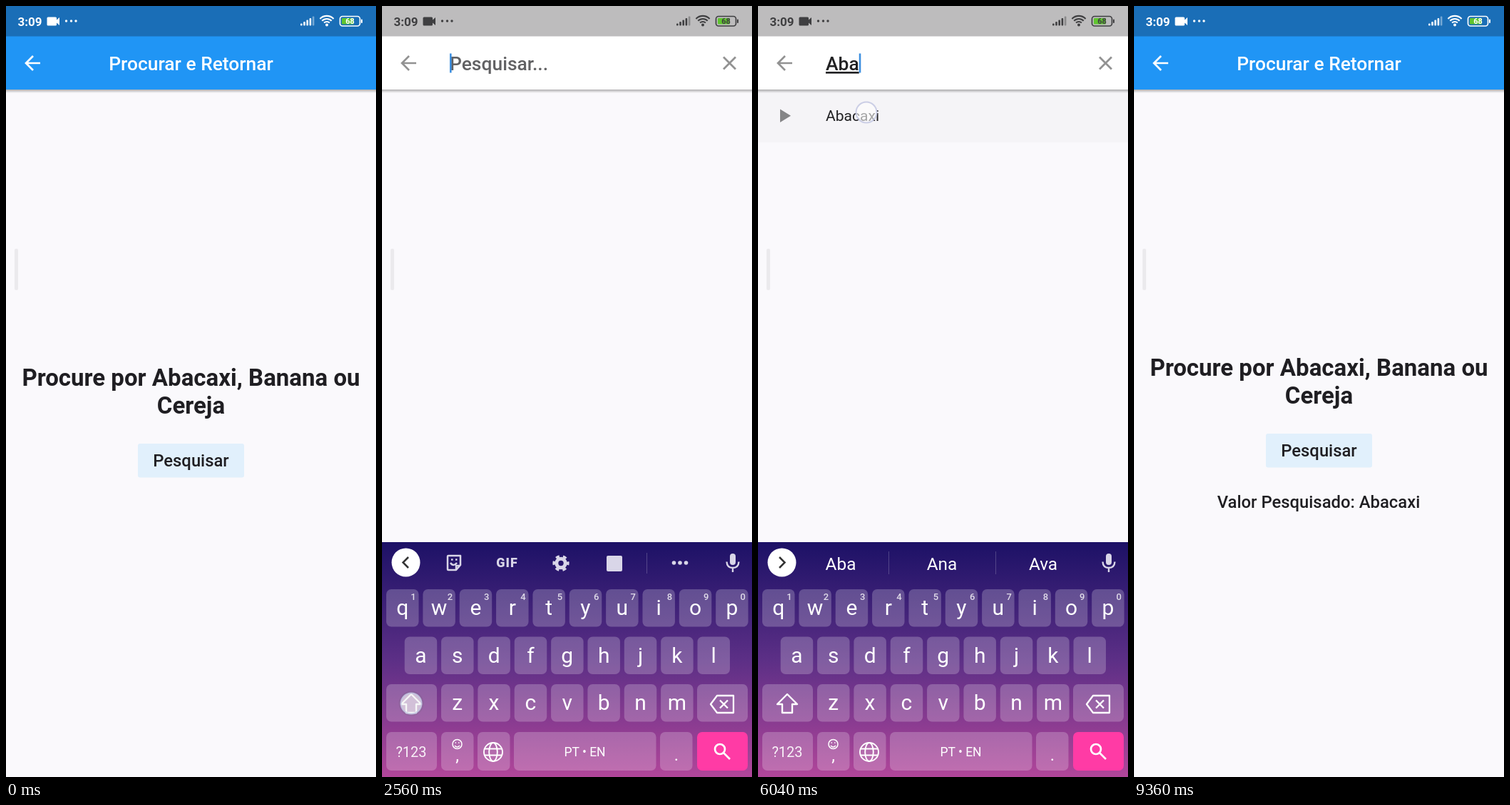
These frames come from a looping animation (519x1080 px, 9600 ms). An HTML page:

```html
<!DOCTYPE html>
<html lang="pt">
<head>
<meta charset="utf-8">
<style>
  html, body { margin: 0; width: 100%; height: 100%; overflow: hidden; background: #faf9fc; }
  svg { display: block; width: 100vw; height: 100vh; }
  text { font-family: Roboto, sans-serif; white-space: pre; }
  .mid { text-anchor: middle; }
  .bar { font-size: 26.4px; font-weight: 500; }
  .line { fill: none; stroke: currentColor; }
  .body { fill: #1f1e22; text-anchor: middle; }
</style>
</head>
<body>
<svg viewBox="0 0 519 1080">
  <defs>
    <linearGradient id="night" x1="0" y1="0" x2="0" y2="1">
      <stop offset="0" stop-color="#1c1166"/>
      <stop offset=".5" stop-color="#5c2f86"/>
      <stop offset="1" stop-color="#b1469a"/>
    </linearGradient>
    <linearGradient id="shade" x1="0" y1="0" x2="0" y2="1">
      <stop offset="0" stop-opacity=".3"/>
      <stop offset="1" stop-opacity="0"/>
    </linearGradient>
    <path id="arrow" class="line" stroke-width="2.7" d="M48 80H29M38 70L28 80L38 90"/>
  </defs>

  <g id="home">
    <rect width="519" height="1080" fill="#faf9fc"/>
    <rect y="117" width="519" height="5" fill="url(#shade)"/>
    <rect y="42" width="519" height="75" fill="#2095f5"/>
    <rect width="519" height="42.5" fill="#1a6eb7"/>
    <use href="#arrow" color="#fff"/>
    <text class="bar mid" x="259.5" y="90" fill="#fff">Procurar e Retornar</text>
    <g id="content">
      <g class="body" font-size="33" font-weight="700">
        <text x="259.5" y="532">Procure por Abacaxi, Banana ou</text>
        <text x="259.5" y="571">Cereja</text>
      </g>
      <rect x="185" y="613" width="149" height="47.5" rx="3" fill="#e1f0fc"/>
      <rect id="press" x="185" y="613" width="149" height="47.5" rx="3"/>
      <g class="body" font-size="23.8" font-weight="500">
        <text x="259.5" y="645">Pesquisar</text>
        <text id="result" x="259" y="717">Valor Pesquisado: Abacaxi</text>
      </g>
    </g>
  </g>

  <g id="search">
    <rect width="519" height="1080" fill="#faf9fc"/>
    <rect id="rowPress" y="117" width="519" height="74"/>
    <g id="list"></g>
    <rect y="117" width="519" height="5" fill="url(#shade)"/>
    <rect y="42" width="519" height="75" fill="#fff"/>
    <rect width="519" height="42.5" fill="#bdbcbd"/>
    <use href="#arrow" color="#929292"/>
    <path class="line" color="#929292" stroke-width="2.7" d="M479 71.5L496 88.5M496 71.5L479 88.5"/>
    <text id="query" class="bar" x="95" y="90"></text>
    <rect id="cursor" y="66.5" width="2.6" height="27" fill="#3e90e0"/>
  </g>

  <rect x="12" y="340" width="5" height="58" rx="2" fill="#ebeaed"/>

  <g id="status" fill="currentColor">
    <text x="16.5" y="27.5" font-size="17" font-weight="600">3:09</text>
    <path d="M59 15.5H69.5Q71 15.5 71 17V19.5L75 16V27L71 23.5V26Q71 27.5 69.5 27.5H59Q57.500 27.5 57.5 26V17Q57.5 15.5 59 15.5Z"/>
    <circle cx="84.5" cy="21" r="1.7"/><circle cx="91.500" cy="21" r="1.7"/><circle cx="98" cy="21" r="1.7"/>
    <g id="signal"></g>
    <g id="wifi" class="line" stroke-width="2.1"></g>
    <circle cx="450" cy="26.5" r="2"/>
    <rect x="468.500" y="14.500" width="28" height="13.500" rx="3.500" class="line" stroke-width="1.7"/>
    <rect x="498" y="18.500" width="2" height="5.500" rx="1"/>
    <rect x="471" y="17" width="17" height="8.500" rx="1" fill="#5fc52e"/>
    <text class="mid" x="482.500" y="25.200" font-size="11" font-weight="600">68</text>
  </g>

  <g id="keyboard" color="#fff" fill="#fff">
    <rect y="751" width="519" height="329" fill="url(#night)"/>
    <g id="tools" color="#d9d6e8" fill="#d9d6e8">
      <path class="line" stroke-width="2.500" stroke-linejoin="round" d="M93 770H110V783L104 790H93Q92 790 92 789V771Q92 770 93 770ZM104 789V784H110M96 780Q100 786 105 780M97 775.500H99.500M103 775.500H105.500"/>
      <text class="mid" x="175.500" y="786" font-size="18" font-weight="900" letter-spacing="1">GIF</text>
      <g class="line">
        <circle cx="251" cy="780.500" r="6.200" stroke-width="5"/>
        <circle cx="251" cy="780.500" r="9.800" stroke-width="3.600" stroke-dasharray="5.130" stroke-dashoffset="2.500"/>
      </g>
      <rect x="315" y="770" width="22" height="22" rx="2"/>
      <rect x="371" y="766" width="1" height="29" opacity=".25"/>
      <circle cx="409.500" cy="780" r="2.800"/><circle cx="418" cy="780" r="2.800"/><circle cx="426.500" cy="780" r="2.800"/>
    </g>
    <g id="words" font-size="24.400" class="mid">
      <text x="116" y="790"></text><text x="258" y="790"></text><text x="400" y="790"></text>
      <path class="line" opacity=".2" d="M183.500 764V796M333.500 764V796"/>
    </g>
    <circle cx="33.500" cy="779.500" r="20"/>
    <path id="chevron" class="line" color="#333" stroke-width="2.500"/>
    <g color="#d9d6e8" fill="#d9d6e8">
      <rect x="488" y="767" width="8" height="16" rx="4"/>
      <path class="line" stroke-width="2.400" d="M483.500 778.500Q484 787 492 787T500.500 778.500M492 787V793"/>
    </g>
    <g id="keys"></g>
    <path id="shift" class="line" stroke-width="2.400" stroke-linejoin="round" d="M41 964L55 978H48V990H34V978H27Z"/>
    <path class="line" stroke-width="2.300" stroke-linejoin="round" d="M470 966H493V990H470L461 978ZM474 972.500L485 983.500M485 972.500L474 983.500"/>
    <g class="mid">
      <text x="41" y="1052" font-size="20" opacity=".9">?123</text>
      <text x="105.500" y="1058" font-size="24">,</text>
      <text x="284.500" y="1051" font-size="17.500">PT • EN</text>
      <text x="413" y="1057" font-size="24">.</text>
    </g>
    <g class="line" stroke-width="1.500">
      <circle cx="105.500" cy="1034" r="6.500"/>
      <path d="M102 1036Q105.500 1040 109 1036M102.500 1032H104M107 1032H108.500"/>
    </g>
    <g class="line" stroke-width="1.900">
      <circle cx="156" cy="1045" r="13"/><ellipse cx="156" cy="1045" rx="5.800" ry="13"/>
      <path d="M144 1040.500H168M144 1049.500H168"/>
    </g>
    <path class="line" stroke-width="2.700" d="M479.500 1046.500L488 1055"/>
    <circle class="line" cx="474" cy="1041" r="7" stroke-width="2.700"/>
  </g>

  <g id="touch">
    <circle id="halo" fill="#555b66"/>
    <circle r="14.500" fill="#fff" fill-opacity=".6" stroke="#c3c7e2" stroke-width="2" stroke-opacity=".85"/>
  </g>
</svg>

<script>
const LOOP = 9600;
const $ = id => document.getElementById(id);
const clamp = v => Math.max(0, Math.min(1, v));
const ramp = (t, start, length) => clamp((t - start) / length);
const show = (el, on) => el.setAttribute('visibility', on ? 'visible' : 'hidden');

function add(parent, tag, attrs, text = '') {
  const el = document.createElementNS('http://www.w3.org/2000/svg', tag);
  for (const name in attrs) el.setAttribute(name, attrs[name]);
  el.textContent = text;
  return parent.appendChild(el);
}

const rows = ['Abacaxi', 'Banana', 'Cereja'].map((name, i) => {
  const row = add($('list'), 'g', { transform: `translate(0 ${i * 74})` });
  add(row, 'path', { d: 'M31 144.5L46 153.700L31 163Z', fill: '#858587' });
  add(row, 'text', { x: 95, y: 161, 'font-size': 21.1, fill: '#212123' }, name);
  return row;
});

for (let i = 0; i < 5; i++) {
  const h = 3 + i * 2.5;
  add($('signal'), 'rect', { x: 413 + i * 4.2, y: 27.5 - h, width: 2.6, height: h, rx: 1, opacity: i < 4 ? 1 : .4 });
}
for (const r of [5.5, 9.5, 13.5]) {
  const s = r * .71;
  add($('wifi'), 'path', { d: `M${450 - s} ${27.5 - s}A${r} ${r} 0 0 1 ${450 + s} ${27.5 - s}` });
}

const PITCH = 51.35;
const letters = [];
const key = (x, y, width, height = 52.5, fill = 'rgba(255,255,255,.22)') =>
  add($('keys'), 'rect', { x, y, width, height, rx: 7, fill });

[['qwertyuiop', 6, 817], ['asdfghjkl', 31.7, 883.5], ['zxcvbnm', 83, 950]].forEach(([chars, left, y], line) => {
  [...chars].forEach((char, i) => {
    const x = left + i * PITCH;
    key(x, y, 45.5);
    const el = add($('keys'), 'text', { x: x + 22.7, y: y + 36, 'font-size': 30, class: 'mid' });
    letters.push({ el, char });
    if (!line) add($('keys'), 'text', { x: x + 38, y: y + 15, 'font-size': 13, 'font-weight': 500, class: 'mid', opacity: .8 }, (i + 1) % 10);
  });
});
key(6, 950, 71); key(442, 950, 71);
key(6, 1017, 71, 54); key(83, 1017, 45.5, 54); key(134, 1017, 45.5, 54);
key(185, 1017, 199.5, 54); key(390, 1017, 45.5, 54);
key(442, 1017, 71, 54, '#ff3ba5');

// x, y, finger down, finger up
const touches = [
  [218, 643, 820, 1080],
  [41, 977, 2480, 2600],
  [54, 910, 3180, 3300],
  [310, 977, 4180, 4300],
  [54, 910, 4880, 5000],
  [152, 149, 6000, 6840]
];
// time, typed text, suggestions
const typing = [
  [1400, '', []],
  [3300, 'A', ['A', 'Aí', 'Acho']],
  [4300, 'Ab', ['Ab', 'Abre', 'Abs']],
  [5000, 'Aba', ['Aba', 'Ana', 'Ava']]
];

function drawTouch(t) {
  const active = touches.find(([, , down, up]) => t >= down && t < up + 400);
  show($('touch'), active);
  if (!active) return;
  const [x, y, down, up] = active;
  const press = ramp(t, down + 40, 160) * (1 - ramp(t, up, 120));
  $('touch').setAttribute('transform', `translate(${x} ${y})`);
  $('touch').setAttribute('opacity', ramp(t, down, 40) * (1 - ramp(t, up, 400)));
  $('halo').setAttribute('r', 15 + 10 * press);
  $('halo').setAttribute('opacity', .55 * press);
}

function drawSearch(t) {
  const [since, text, words] = typing.findLast(step => t >= step[0]) || typing[0];
  const closing = t > 6900;
  const query = $('query');
  query.textContent = text || 'Pesquisar...';
  query.setAttribute('fill', text ? '#212123' : '#616163');
  query.style.textDecoration = text && !closing ? 'underline' : 'none';
  $('cursor').setAttribute('x', text ? 95 + query.getComputedTextLength() : 95);
  show($('cursor'), !closing && t >= 1400 && (t - since) % 1000 < 500);
  rows.forEach((row, i) => show(row, text && (text === 'A' || i === 0)));
  $('rowPress').setAttribute('opacity', .02 * ramp(t, 5990, 40) + .05 * ramp(t, 6060, 200));

  show($('tools'), !text);
  show($('words'), text);
  words.forEach((word, i) => $('words').children[i].textContent = word);
  $('chevron').setAttribute('d', text ? 'M30 772L37.500 779.500L30 787' : 'M37 772L29.500 779.500L37 787');
  const upper = t >= 2600 && t < 3300;
  letters.forEach(({ el, char }) => el.textContent = upper ? char.toUpperCase() : char);
  $('shift').style.fill = upper ? '#fff' : 'none';
}

function draw(t) {
  const opacity = ramp(t, 1100, 250) * (1 - ramp(t, 6960, 270));
  $('search').setAttribute('opacity', opacity);
  $('status').setAttribute('color', opacity > .5 ? '#3f3f41' : '#fff');

  const returned = t > 6900;
  $('content').setAttribute('transform', `translate(0 ${returned ? -14 : 0})`);
  show($('result'), returned);
  $('press').setAttribute('opacity', returned ? 0 : .155 * ramp(t, 840, 180));

  drawSearch(t);
  const hidden = (1 - ramp(t, 1360, 270)) ** 2 + ramp(t, 7100, 210) ** 2;
  $('keyboard').setAttribute('transform', `translate(0 ${330 * hidden})`);
  drawTouch(t);
}

function tick() {
  draw(performance.now() % LOOP);
  requestAnimationFrame(tick);
}
tick();
</script>
</body>
</html>
```
